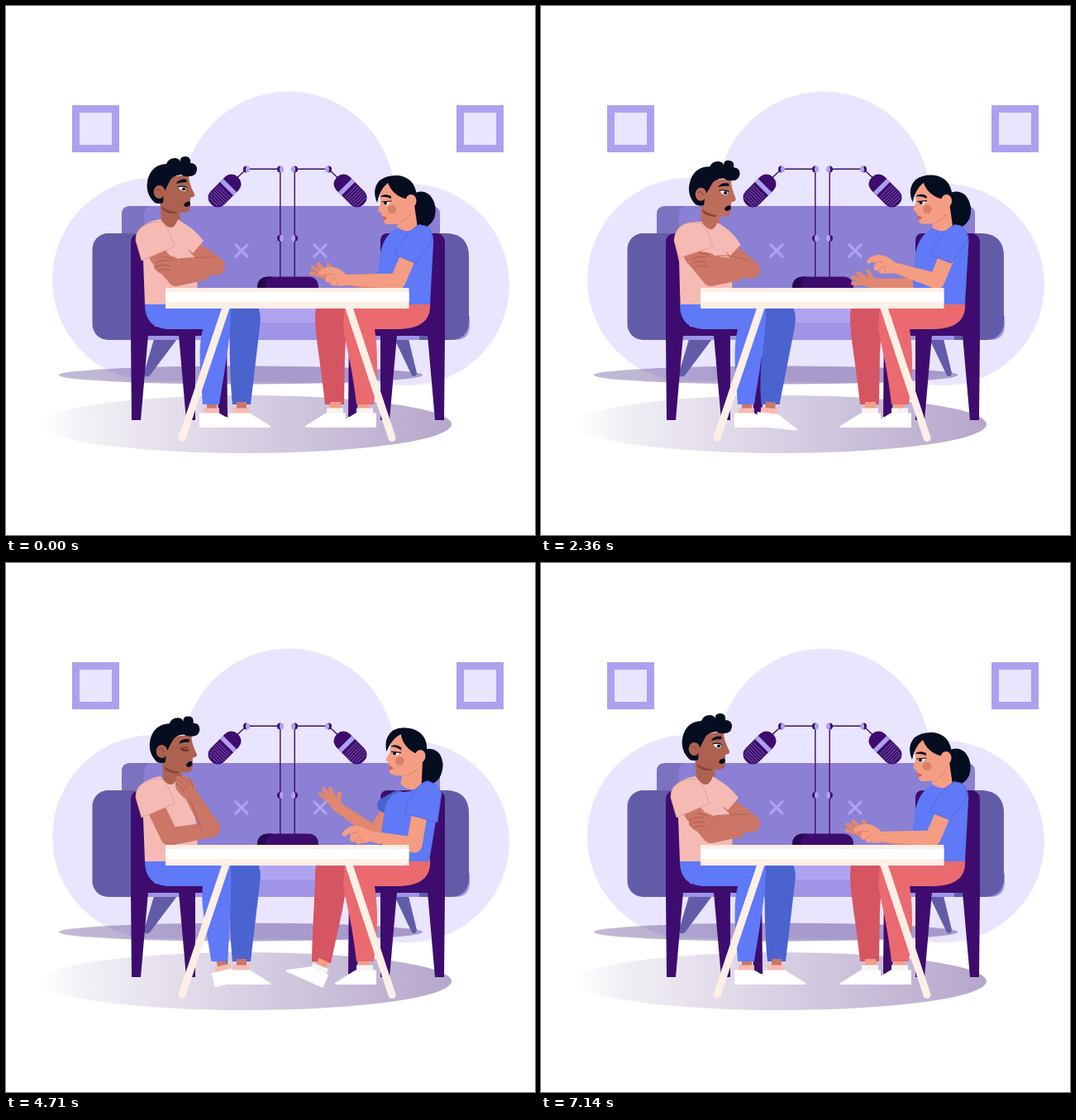
An HTML page for the animation above (7.21 s loop, 640 by 640 pixels).

```html
<!DOCTYPE html>
<html lang="en">
<head>
<meta charset="utf-8">
<title>Podcast talk</title>
<style>
html, body { margin: 0; width: 100%; height: 100%; overflow: hidden; background: #fff; }
svg { display: block; width: 100vw; height: 100vh; }
.line { fill: none; stroke-linecap: round; stroke-linejoin: round; }
.lilac { fill: #e9e5ff; }
.plum { fill: #3e0c6e; }
.slate { fill: #625ca8; }
.ink { fill: #050d20; }
.blue { fill: #5f79f7; }
.navy { fill: #4b63cf; }
.pink { fill: #f6bab4; }
.coral { fill: #ea6a70; }
.rose { fill: #d65562; }
.tan { fill: #cb7666; }
.peach { fill: #f49d83; }
.clay { fill: #e2876f; }
.white { fill: #fff; }
.skin { fill: var(--skin); }
.fold { stroke: #4b63cf; stroke-width: .7; }
.seam { stroke: #d9968f; stroke-width: .7; }
</style>
</head>
<body>
<svg viewBox="0 0 640 640">
<defs>
  <linearGradient id="floor"><stop offset="0" stop-color="#fff"/><stop offset=".12" stop-color="#f2eff5"/><stop offset="1" stop-color="#b5a6cb"/></linearGradient>
  <linearGradient id="shade"><stop offset="0" stop-color="#675197" stop-opacity=".4"/><stop offset=".5" stop-color="#675197" stop-opacity=".5"/></linearGradient>
  <g id="frame"><path class="lilac" d="M84.5 124.500h48v48h-48z" stroke="#ada0ef" stroke-width="9"/></g>
  <g id="joint"><circle r="4" fill="#ada0ef"/><path class="plum" d="M0 -4A4 4 0 0 0 0 4Q-2 0 0 -4Z"/></g>
  <g id="mic">
    <path class="line" stroke="#3e0c6e" stroke-width="1.400" d="M274 213L291 197.300H331.800V328"/>
    <g transform="translate(264.500 223.500) rotate(45)">
      <rect class="plum" x="-11.500" y="-23" width="23" height="46" rx="10.500"/>
      <path fill="#ada0ef" d="M-11.500 -9h23v5.500h-23z"/>
      <path class="line" stroke="#a596dd" stroke-width=".6" d="M-10 1H10M-10 4H10M-10 7H10M-10 10H10M-10 13H10M-9 16H9M-7 19H7"/>
    </g>
    <use href="#joint" x="291" y="197.500"/><use href="#joint" x="332" y="197.500"/><use href="#joint" x="332" y="281"/>
  </g>
  <g id="chair" class="plum">
    <path d="M151 398h21l-9 103h-11zM209 398h20v103h-11zM254 388h13l1 109h-11z"/>
    <path d="M151 399V287Q151 275 163 275H180V388H240V399Z"/>
  </g>
  <path id="cross" class="line" stroke="#ada0ef" stroke-width="3.300" d="M-7 -7L7 7M7 -7L-7 7"/>
</defs>

<g class="lilac">
  <circle cx="342" cy="232" r="128.500"/>
  <ellipse cx="179" cy="331" rx="123" ry="123"/>
  <circle cx="487" cy="337" r="122"/>
  <path d="M179 230H487V459Q320 453 179 454Z"/>
</g>
<use href="#frame"/><use href="#frame" x="465"/>
<ellipse cx="284" cy="446.500" rx="220" ry="11" fill="url(#shade)"/>
<ellipse cx="290" cy="506" rx="249" ry="35" fill="url(#floor)"/>

<path class="slate" d="M179 403H207L174 447Q168 451 167 444ZM470 403H487L497 444Q496 450 491 447Z"/>
<path fill="#7b72c0" d="M140 390V252Q140 242 150 242H220V390Z"/>
<path fill="#8b80d4" d="M167 380V252Q167 242 177 242H515Q525 242 525 252V380Z"/>
<path fill="#9f94e6" d="M130 375H561V386Q561 404 543 404H130Z"/>
<path fill="#b0a4f0" d="M160 365H510V383H160Z"/>
<rect class="slate" x="104.500" y="275" width="68" height="129" rx="19"/>
<path class="slate" d="M500 275H535Q560 277 560 303V384Q558 403 538 404H500Z"/>
<use href="#cross" x="285" y="296"/><use href="#cross" x="380" y="296"/>

<use href="#chair"/>
<use href="#chair" transform="matrix(-1 0 0 1 682 0)"/>
<path class="plum" d="M453 390V284Q453 275 462 275H519Q531 276 531 288V390Z"/>

<use href="#mic"/>
<use href="#mic" transform="matrix(-1 0 0 1 681 0)"/>
<path class="plum" d="M304 341Q304 327.500 318 327.500H366Q378 328 378 341Z"/>
<path fill="#2a0850" d="M304 341Q304 327.500 318 327.500H322Q314 331 314 341Z"/>

<g id="man">
  <path id="mFarLeg" class="navy"/>
  <g id="mNearFoot">
    <path class="tan" d="M243 479H255V489H243Z"/><path class="pink" d="M239 486.500H258V494H239Z"/>
    <path class="white" d="M234 492.500H258L284 508V510H234Z"/>
  </g>
  <g id="mFarFoot">
    <path class="tan" d="M279 479H291V489H279Z"/><path class="pink" d="M274 486.500H294V494H274Z"/>
    <path class="white" d="M270 492.500H295L320 508V510H270Z"/>
  </g>
  <path id="mNearLeg" class="blue"/>
  <g id="mHead">
    <path class="skin" d="M186 232L188 262Q198 277 211 266L209 240Z"/>
    <path fill="#8b4337" d="M189 243Q197 249 207 249L206 251Q195 252 189 246Z"/>
    <path class="skin" d="M187 208L221 204Q221 215 228 227.500Q229 231 223 232L223 240Q224 249 216 250Q200 250 189 241Z"/>
    <path class="ink" d="M180 238Q167 226 172 208Q177 192 194 191Q197 184 204 184Q209 184 211 188Q210 182 217 182Q224 182 223 190Q231 190 231 198Q230 206 222 206Q216 207 212 204Q201 205 198 212L191 226L190 238Q185 240 180 238Z"/>
    <ellipse class="skin" cx="185.500" cy="225" rx="6.800" ry="8"/>
    <path class="line" stroke="#8b4337" d="M182 223Q187 220 188 226"/>
    <path class="ink" d="M206 215Q208 209 218 209.500L219 213Q212 213 206 215Z"/>
    <g id="mOpen"><path class="white" d="M208 219Q213 217 218 219.500L217 224Q212 225 208 219Z"/><circle class="ink" cx="215" cy="221.500" r="2.100"/><path class="line" stroke="#050d20" stroke-width="1.300" d="M208 219Q213 217 218.500 219.500"/></g>
    <g id="mShut"><path fill="#96483d" d="M208 220Q213 216 218 219.500Q217 225 212 224Z"/><path class="line" stroke="#3d1720" d="M208 221Q212 225 218 223"/></g>
    <path id="mMouth" class="ink" d="M215 241Q217 236 222 236.500L223 240Q221 243.500 217 243Z"/>
  </g>
  <path id="mTorso" class="pink"/>
  <path id="mNearArm" class="tan"/>
  <path id="mNearSleeve" class="pink seam"/>
  <path id="mFarArm" class="tan"/>
  <path id="mFarSleeve" class="pink"/>
  <path id="mCrease" class="line" stroke="#ad5b4e" stroke-width=".8"/>
  <g id="mHand">
    <path class="tan" d="M2 -8Q-8 -13 -17 -10Q-25 -7 -27 0Q-28 7 -22 9Q-17 14 -10 12Q-2 12 3 8Z"/>
    <path class="line" stroke="#ad5b4e" stroke-width=".9" d="M-26 0Q-18 -6 -9 -5M-25 5Q-17 -1 -8 1M-21 9Q-14 4 -6 6M-18 -9Q-9 -10 -4 -6"/>
  </g>
</g>

<g id="woman">
  <path id="wFarLeg" class="rose"/>
  <g id="wNearFoot">
    <path class="peach" d="M427 479H439V489H427Z"/><path fill="#f7f3f5" d="M424 486.500H444V494H424Z"/>
    <path class="white" d="M398 508L423 492.500H448V510H398Z"/>
  </g>
  <g id="wFarFoot">
    <path class="peach" d="M392 479H405V489H392Z"/><path fill="#f7f3f5" d="M388 486.500H408V494H388Z"/>
    <path class="white" d="M362 508L387 492.500H411V510H362Z"/>
  </g>
  <path class="coral" d="M513 358Q516 390 476 391H446C451 420 449 455 445 482H424C420 445 413 415 408 391L410 358Z"/>
  <path id="wFarArm" class="clay"/>
  <g id="wFarHand">
    <path class="clay" d="M2 -5Q-8 -9 -15 -6L-18 2Q-12 8 2 6Z"/>
    <path class="line" stroke="#e2876f" stroke-width="5" d="M-14 -4L-25 -9M-15 -1L-30 -3M-14 2L-29 4M-7 -4L-13 -13"/>
  </g>
  <path id="wFarSleeve" class="navy"/>
  <g id="wHead">
    <path class="ink" d="M490 229Q503 220 513 229Q523 241 518 257Q511 271 497 268Q491 265 493 252Z"/>
    <path class="peach" d="M474 252L493 234L498 268Q488 284 473 273Z"/>
    <path class="line" stroke="#d8806b" d="M475 262Q485 260 489 252"/>
    <path class="peach" d="M452 216Q476 205 494 230L489 250Q481 264 466 264Q457 265 457 260L455 254Q455 250 451 249Q449 247 453 239Z"/>
    <path class="ink" d="M449 238Q442 222 452 211Q461 204 475 205Q495 208 497 230L486 234Q468 230 462 214Q452 222 449 238Z"/>
    <ellipse class="peach" cx="490" cy="236" rx="6.500" ry="8"/>
    <path class="ink" d="M452 231Q458 226 466 230L466 233Q459 230 452 231Z"/>
    <circle cx="467" cy="246" r="5.300" fill="#d9806b"/>
    <g id="wOpen"><path class="white" d="M456 237L465 236Q464 241 458 241Z"/><circle class="ink" cx="459" cy="238.500" r="2"/><path class="line" stroke="#050d20" stroke-width="1.200" d="M455 237L466 236"/></g>
    <path id="wShut" class="line" stroke="#8c463c" d="M455 237L464 239M457 242L466 236"/>
    <path fill="#d65f56" d="M455 254Q459 254 461 257Q459 259 456 259Z"/>
  </g>
  <path id="wTorso" class="blue"/>
  <path id="wNearArm" class="peach"/>
  <path id="wSleeve" class="blue fold"/>
  <g id="wNearHand">
    <path class="peach" d="M2 -6Q-8 -13 -18 -12Q-28 -10 -32 -2Q-31 2 -27 0Q-24 -3 -21 -2L-22 5Q-20 9 -16 7Q-13 12 -8 9Q0 9 3 6Z"/>
    <path class="line" stroke="#d8806b" stroke-width=".9" d="M-21 -2Q-16 -5 -12 -3M-16 7Q-13 1 -9 1M-8 9Q-6 6 -8 4"/>
  </g>
</g>

<path fill="#fcefe6" d="M193 341H487.500V366H193Z"/>
<path class="white" d="M193 346H487.500V358H193Z"/>
<path class="line" stroke="#fcefe6" stroke-width="9" d="M213 522.500L266 365M467 522.500L415 365"/>
</svg>

<script>
const LOOP = 7210, STEP = LOOP / 100;
const $ = id => document.getElementById(id);
const mix = (a, b, k) => a + (b - a) * k;
const mixAll = (a, b, k) => a.map((v, i) => mix(v, b[i], k));
const ease = k => k * k * (3 - 2 * k);

// Eased value at time t from rows of [time, value or list].
function track(t, rows) {
  const i = rows.findIndex(r => r[0] > t);
  if (i < 0) return rows[rows.length - 1][1];
  if (i === 0) return rows[0][1];
  const [t0, a] = rows[i - 1], [t1, b] = rows[i];
  const k = ease((t - t0) / (t1 - t0));
  return Array.isArray(a) ? mixAll(a, b, k) : mix(a, b, k);
}

// Blend paths of the same structure.
function morph(a, b, k) {
  const to = b.match(/-?[\d.]+/g);
  let i = 0;
  return a.replace(/-?[\d.]+/g, n => mix(+n, +to[i++], k).toFixed(2));
}

// Tapered limb with round ends.
function limb(x, y, r, x2, y2, r2) {
  const len = Math.hypot(x2 - x, y2 - y) || 1;
  const nx = (y - y2) / len, ny = (x2 - x) / len;
  return `M${x + nx * r} ${y + ny * r}L${x2 + nx * r2} ${y2 + ny * r2}` +
    `A${r2} ${r2} 0 0 0 ${x2 - nx * r2} ${y2 - ny * r2}` +
    `L${x - nx * r} ${y - ny * r}A${r} ${r} 0 0 0 ${x + nx * r} ${y + ny * r}Z`;
}
const arm = ([sx, sy, ex, ey, wx, wy], rs, re, rw) =>
  limb(sx, sy, rs, ex, ey, re) + limb(ex, ey, re, wx, wy, rw);

const draw = (id, d) => $(id).setAttribute('d', d);
const move = (id, tf) => $(id).setAttribute('transform', tf);
const turn = (id, x, y, dx, dy, deg) => move(id, `translate(${dx} ${dy}) rotate(${deg} ${x} ${y})`);
const show = (id, on) => $(id).style.display = on ? '' : 'none';

function blink(who, t, starts) {
  const shut = starts.some(s => t >= s && t < s + 170);
  show(who + 'Open', !shut);
  show(who + 'Shut', shut);
}

const shirt = {
  rest: 'M187 258Q160 262 157 282L166 308L168 361L232 361L231 320L222 270Q215 262 208 258Q201 278 187 258Z',
  lean: 'M200 263Q168 260 164 284L168 310L169 361L232 361L230 320L232 278Q226 268 218 266Q212 280 200 263Z'
};
const nearSleeve = {
  rest: 'M170 264Q156 270 157 284L164 308L204 291Q198 272 190 262Q178 260 170 264Z',
  lean: 'M178 263Q166 268 165 284L170 302L211 292Q208 275 198 264Q186 261 178 263Z'
};
const farSleeve = {
  rest: 'M208 259Q227 268 239 284L226 299L212 287Z',
  lean: 'M218 266Q234 272 244 293L231 305L218 290Z',
  chin: 'M207 261Q211 266 214 278L216 292L206 287Z'
};
const blouse = {
  rest: 'M474 268Q458 276 453 298L449 330L453 361L513 361L517 288Q519 268 500 264Q488 278 474 268Z',
  back: 'M482 277Q465 276 459 294L454 325L456 361L512 361L522 300Q528 272 510 263Q498 276 482 277Z'
};
const blouseSleeve = {
  rest: 'M492 270Q478 284 470 301L495 311L516 284Q516 264 500 265Q496 266 492 270Z',
  back: 'M497 273Q486 285 482 303L522 314L527 278Q520 264 508 264Q502 266 497 273Z'
};

function man(t) {
  const lean = track(t, [[0, 0], [800, 1], [1900, 1], [2750, 0]]);
  const chin = track(t, [[2950, 0], [3640, 1], [6150, 1], [6820, 0]]);
  const foot = track(t, [[4250, 0], [4950, 1], [6300, 1], [7100, 0]]);
  const talk = (t > 800 && t < 1250) || (t > 1400 && t < 1950) || (t > 4400 && t < 5900);
  const rub = chin * (t > 4500 && t < 6050 ? 1.5 * Math.sin((t - 4500) / 250) : 0);

  turn('mHead', 184, 224, 15 * lean + 3 * chin, 5 * lean + 3 * chin, 7 * lean + chin);
  $('mHead').style.setProperty('--skin', `rgb(${mixAll([173, 98, 80], [203, 118, 102], lean)})`);
  blink('m', t, [2400, 4640, 5720]);
  const open = talk ? 1.1 + .2 * Math.sin(t / 75) : 1;
  move('mMouth', `translate(0 ${236 * (1 - open)}) scale(1 ${open})`);

  draw('mTorso', morph(shirt.rest, shirt.lean, lean));
  draw('mNearSleeve', morph(nearSleeve.rest, nearSleeve.lean, lean));
  draw('mFarSleeve', lean ? morph(farSleeve.rest, farSleeve.lean, lean) : morph(farSleeve.rest, farSleeve.chin, chin));

  const near = mixAll([184, 302, 206, 328, 238, 323], [184, 302, 198, 331, 246, 323], chin);
  const rest = [228, 292, 254, 315, 206, 314, 6];
  const far = lean
    ? mixAll(rest, [235, 299, 254, 322, 210, 307, 10], lean)
    : mixAll(rest, [236, 304, 248, 321, 223, 278 + rub, 58], chin);
  draw('mNearArm', arm(near, 11, 11, 9));
  draw('mFarArm', arm(far, 8, 11, 8));
  const [, , ex, ey, wx, wy, deg] = far;
  draw('mCrease', chin < .5
    ? `M${wx + 4} ${wy - 8}Q${wx + 20} ${wy - 10} ${ex - 3} ${ey - 11}`
    : `M${wx - 1} ${wy + 6}L${ex - 12} ${ey}`);
  move('mHand', `translate(${wx} ${wy}) rotate(${deg}) scale(${mix(1, .92, chin)})`);

  const a = -14 * lean, b = 18 * foot;
  draw('mFarLeg', `M268 360H303Q310 372 307 388L${296 + a} 482H${274 + a}C${270 + a} 440 271 410 270 366Z`);
  draw('mNearLeg', `M168 361H272C273 390 ${268 + b * .3} 420 ${258 + b * .85} 482H${238 + b * .85}C${235 + b * .6} 440 ${232 + b * .25} 415 238 391H195Q168 389 168 361Z`);
  turn('mFarFoot', 284, 484, a, 0, 12 * lean);
  turn('mNearFoot', 248, 484, b, foot, -15 * Math.min(1, foot * 1.3));
}

function woman(t) {
  const back = track(t, [[2100, 0], [3640, 1], [6000, 1], [7080, 0]]);
  const foot = track(t, [[3700, 0], [4400, 1], [6250, 1], [7000, 0]]);
  turn('wHead', 490, 236, 11 * back, -2 * back, 11 * back);
  blink('w', t, [1630, 3300, 5400]);
  draw('wTorso', morph(blouse.rest, blouse.back, back));
  draw('wSleeve', morph(blouseSleeve.rest, blouseSleeve.back, back));

  const low = [488, 300, 474, 333, 409, 331, 12];
  const point = [486, 302, 469, 329, 417, 306, 10];
  const calm = [500, 306, 494, 340, 440, 323, 12];
  const near = track(t, [[100, low], [1220, point], [1900, point], [2750, [496, 306, 490, 337, 434, 327, 10]],
    [3640, calm], [4150, calm], [4650, [500, 306, 494, 341, 438, 330, 0]], [5900, calm], [6080, calm], [7080, low]]);
  draw('wNearArm', arm(near, 9.5, 9.5, 6));
  move('wNearHand', `translate(${near[4]} ${near[5]}) rotate(${near[6]})`);

  const flat = [472, 296, 452, 336, 398, 330, 21];
  const open = [472, 296, 452, 336, 400, 331, 21];
  const palm = [472, 296, 454, 336, 409, 336, 6];
  const lift = [464, 294, 446, 326, 404, 297, 44];
  const wave = [464, 294, 447, 326, 408, 300, 34];
  const hid = [472, 296, 456, 341, 419, 345, 0];
  const far = track(t, [[100, flat], [1220, open], [1900, open], [2600, [472, 296, 454, 338, 411, 339, 2]], [3640, palm],
    [4000, palm], [4640, lift], [4900, lift], [5200, wave], [5500, lift], [6150, hid], [6250, hid], [7080, flat]]);
  const up = track(t, [[4000, 0], [4600, 1], [5500, 1], [6100, 0]]);
  draw('wFarArm', arm(far, 7, 8, 6));
  move('wFarHand', `translate(${far[4]} ${far[5]}) rotate(${far[6]})`);
  draw('wFarSleeve', limb(474, 284, 9, mix(472, 458, up), 293, 9));

  const dx = -16 * foot;
  draw('wFarLeg', `M377 360H412Q412 395 ${410 - 3 * foot} 420L${409 + dx} ${482 + 2 * foot}L${386 + dx} 482C${382 + dx * .7} 440 374 400 374 378Q374 366 377 360Z`);
  turn('wFarFoot', 398, 484, dx, foot, 24 * foot);
}

function tick() {
  const t = Math.floor((performance.now() % LOOP) / STEP) * STEP;
  man(t);
  woman(t);
  requestAnimationFrame(tick);
}
tick();
</script>
</body>
</html>
```
